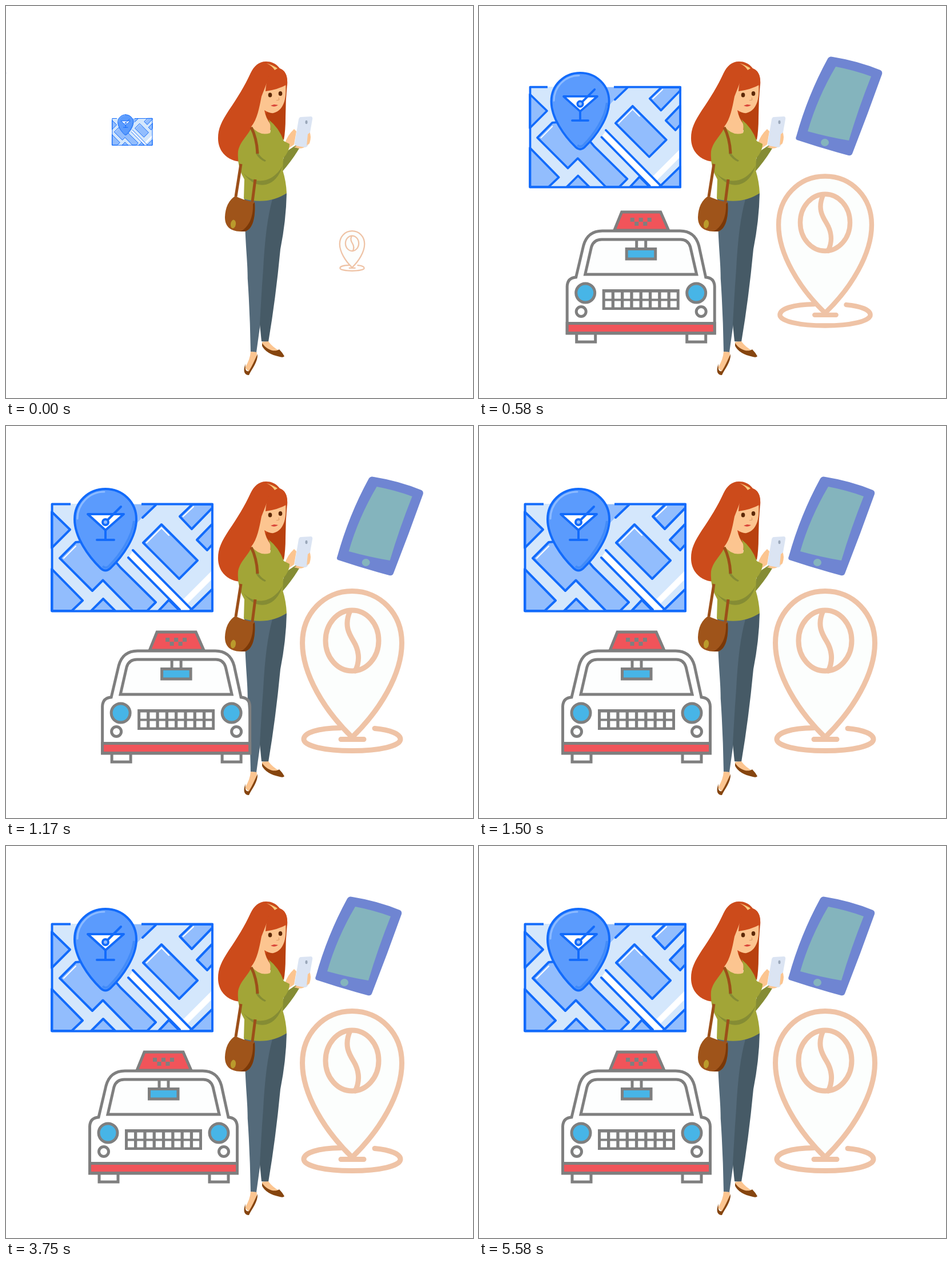
These frames come from a looping animation (817 px wide and 685 px high, 6010 ms). An HTML page:

```html
<!DOCTYPE html>
<html lang="en">
<head>
<meta charset="utf-8">
<title>Out and about</title>
<style>
  html, body { margin: 0; width: 100%; height: 100%; overflow: hidden; background: #fff; }
  svg { display: block; width: 817px; height: 685px; }
  .line { fill: none; stroke: #126bfb; stroke-width: 4; stroke-linecap: round; stroke-linejoin: round; }
  .block { fill: #92bdfd; }
  .shine { fill: none; stroke: #fff; stroke-width: 2; stroke-linecap: round; }
  .car { stroke: #7f7f7f; stroke-width: 5; fill: none; }
  .car .glass { fill: #fdfefe; }
  .car .red { fill: #f1545a; }
  .car .blue { fill: #47b5e7; }
  .car .gray { fill: #7f7f7f; stroke: none; }
  .car .cell { fill: #fdfefe; stroke: none; }
  .coffee { fill: none; stroke: #efc3a6; stroke-width: 9; stroke-linecap: round; stroke-linejoin: round; }
  .skin { fill: #fcc590; }
  .hair { fill: #cc4b1b; }
  .top { fill: #a2a537; }
  .fold { fill: #858c34; }
  .strap { fill: none; stroke: #9c4f19; stroke-width: 5; }
  .shoe { fill: #86450f; }
</style>
</head>
<body>
<svg viewBox="0 0 817 685">
  <g id="tablet">
    <path fill="#6f85d2" d="M597 92Q600 87 606 89Q650 96 689 112Q693 114 692 119Q667 189 640 258Q638 262 633 261Q588 249 543 234Q540 232 542 228Q562 156 597 92Z"/>
    <path fill="#84b4bd" d="M611 106Q643 112 673 123Q651 178 634 235Q598 229 562 219Q579 160 611 106Z"/>
    <ellipse cx="592" cy="238.500" rx="7" ry="6.500" fill="#84b4bd"/>
  </g>

  <g id="woman">
    <path fill="#b9410f" d="M448 178L492 135Q489 165 489 195Q489 218 486 234L456 212Z"/>
    <path class="hair" d="M455 97C442 97 434 105 428 117C417 141 405 160 390 182C377 202 371 214 371 231C371 255 388 270 409 272L432 215L470 170L492 138C493 122 489 113 479 109C472 100 464 97 455 97Z"/>
    <path class="skin" d="M458 130L489 134C491 158 488 182 468 187Q461 188 452 182Q454 195 463 207L462 224Q445 232 429 211C440 197 443 178 447 158Z"/>
    <path class="hair" d="M454 149C455 133 459 114 474 109C488 109 493 122 492 137Q476 146 454 149Z"/>
    <path fill="#f8cb7d" d="M456 100Q468 104 475 109L470 112Q466 105 456 100Z"/>
    <g fill="#5c2908">
      <ellipse cx="462" cy="155.500" rx="3.300" ry="4"/>
      <ellipse cx="480" cy="153" rx="3.300" ry="4"/>
    </g>
    <path d="M473 165L478 164L477 160" fill="none" stroke="#dc9863"/>
    <path fill="#d9453a" d="M463 174L469 172L476 173Q470 178 463 174Z"/>

    <path fill="#546a7a" d="M417 333L468 336L462 410Q455 490 444 562L438 605L428 604Q427 540 423 480C423 440 418 420 417 333Z"/>
    <path fill="#465a66" d="M466 338L491 327Q490 375 480 425Q472 510 459 587L447 586L444 556Q447 500 450 460Q454 380 466 338Z"/>
    <path class="skin" d="M428 604L439 605Q438 622 426 640L418 632Q427 618 428 604ZM448 587L459 586Q466 596 479 603L480 608Q458 604 448 592Z"/>
    <path class="shoe" d="M419 625C414 638 417 645 425 645C430 634 441 622 440 608C435 619 431 628 425 638Q417 640 419 625ZM448 589C455 600 470 606 478 600Q484 606 487 612Q485 615 479 613Q455 608 448 594Z"/>

    <path class="fold" d="M480 291Q484 264 491 254L506 244Q512 243 514 247Q502 268 482 291Z"/>
    <path class="skin" d="M504 247Q512 243 514 235L529 236L531 220Q535 228 531 240Q523 249 513 249ZM487 242Q492 226 504 215L508 219L504 242L494 249Z"/>
    <path class="top" d="M430 211Q444 228 462 222Q465 211 459 198Q478 213 486 236L496 241Q496 254 485 266L484 287Q490 306 491 327Q459 348 416 337L417 303Q404 282 406 254C410 235 422 229 430 211Z"/>
    <path class="fold" d="M413 289C429 311 464 314 484 279Q475 307 455 312C438 316 424 305 413 289ZM437 251Q445 265 455 270L453 272Q444 269 437 258Z"/>

    <path fill="#dbe4f3" d="M516 194L534 193Q537 194 536 198L528 243Q527 247 523 247L507 244Q504 243 505 239L512 198Q513 194 516 194Z"/>
    <ellipse cx="525.500" cy="203" rx="2" ry="3.200" fill="#9aa7b9"/>
    <path class="skin" d="M528 224L532 221L531 238L526 244Z"/>

    <path class="strap" d="M429 212Q439 232 440 258M411 276L402 333M436 303L431 342"/>
    <path fill="#9f541a" d="M401 332Q414 339 435 343C437 370 431 392 417 394C397 395 383 389 383 369Q384 343 401 332Z"/>
    <path fill="#7a3807" d="M435 343C437 370 431 392 417 394L410 394C424 387 433 370 432 346Z"/>
    <ellipse cx="397.500" cy="381" rx="4.500" ry="7.500" fill="#ba9b2c" transform="rotate(8 397 381)"/>
  </g>

  <g id="map">
    <path fill="#d4e7fc" d="M80 136H361V324H80Z"/>
    <path fill="#fff" d="M214 230L222 218L325 322H303ZM308 305L361 252V267L316 312Z"/>
    <g class="line">
      <g class="block">
        <path d="M80 150L112 181L80 213Z"/>
        <path d="M80 250L134 305L115 323H80Z"/>
        <path d="M149 323L170 302L191 323Z"/>
        <path d="M122 203L94 231L151 288L169.500 269.500L222 323H247L262 308L200 247L160 200Z"/>
        <path d="M240 204L272 172L335 235L303 267Z"/>
        <path d="M326 137L304 158L325 180L361 143V137Z"/>
        <path d="M361 171L334 199L352 217L361 207Z"/>
        <path d="M322 323L361 285V323Z"/>
        <path d="M267 323L285 304L304 323Z"/>
        <path d="M200 137H262L238 160L215 185Z" stroke="none"/>
      </g>
      <path d="M262 138L239 160M214 230L304 321M222 217L325 321"/>
      <path stroke-linecap="butt" d="M113 136.500H80.500V323.500H361V136.500H237"/>
    </g>
    <path class="shine" d="M101 231L122 210M246 204L272 178L285 191M310 158L328 141"/>
    <path class="line" style="fill:#5b9bfd" d="M174 110C144 110 120 133 120 163C120 194 144 228 166 249Q174 256 182 249C204 228 228 194 228 163C228 133 204 110 174 110Z"/>
    <path fill="none" stroke="#8dbbff" stroke-width="3" stroke-linecap="round" d="M125 162C125 137 145 115 172 115"/>
    <path fill="none" stroke="#438bf7" stroke-width="4" d="M224 166C221 194 200 225 180 245Q174 250 169 245"/>
    <path class="line" style="fill:#fff" d="M143 154H206L174 182Z"/>
    <path class="line" d="M174 182V199M159 199H189M178 164L201 141"/>
    <circle class="line" style="fill:#8fbcff" cx="174" cy="168" r="5"/>
  </g>

  <g id="pin" class="coffee">
    <path d="M585 527.500C546 528 521 536 521 547.500C521 559 557 567.500 605.500 567.500S690 559 690 547.500C690 538 672 531 645 528.500"/>
    <path fill="#fcfefd" d="M605.500 288.500C556 288.500 518.500 328 518.500 379C518.500 434 557 497 605.500 544C654 497 692.500 434 692.500 379C692.500 328 655 288.500 605.500 288.500Z"/>
    <ellipse cx="605.500" cy="375" rx="46.500" ry="53"/>
    <path d="M602 323C591 348 600 363 608 376S621 408 611 428M586 547.500H626"/>
  </g>

  <g id="taxi" class="car">
    <path d="M163 570V587H196V570M356 570V587H389V570"/>
    <path class="red" d="M242 360H310L324 392H229Z"/>
    <path class="gray" d="M257 370h7v7h-7zM272 370h7v7h-7zM287 370h7v7h-7zM264.500 377h7v7h-7zM279.500 377h7v7h-7z"/>
    <path d="M146.500 572V490Q147 475 162 474L175 419Q182 393 208 393H344Q370 393 377 419L389 474Q404 475 404.500 490V572Z"/>
    <path class="glass" d="M178 469L189 421Q193 408 207 408H345Q358 408 362 421L373 469Z"/>
    <path d="M268 408V424M284 408V424"/>
    <path class="blue" d="M250.500 424.500H301V442H250.500Z"/>
    <g class="blue">
      <circle cx="178.500" cy="501.500" r="16.500"/>
      <circle cx="372.500" cy="501.500" r="16.500"/>
    </g>
    <circle class="glass" cx="171" cy="534" r="8.500"/>
    <circle class="glass" cx="381" cy="534" r="8.500"/>
    <g id="grille"><path class="gray" d="M208 495H343V531H208Z"/></g>
    <path class="red" d="M146.500 554.500H404.500V571.500H146.500Z"/>
  </g>
</svg>
<script>
  const LOOP = 6010, FPS = 12, ENTER = 1500;
  const el = id => document.getElementById(id);
  const svgNS = 'http://www.w3.org/2000/svg';

  for (let i = 0; i < 16; i++) {
    const cell = document.createElementNS(svgNS, 'rect');
    const place = { x: 213 + 16.3 * (i % 8), y: i < 8 ? 500.5 : 515.5, width: 11, height: 11, class: 'cell' };
    for (const key in place) cell.setAttribute(key, place[key]);
    el('grille').append(cell);
  }

  const backOut = p => 1 + 2.70158 * (p - 1) ** 3 + 1.70158 * (p - 1) ** 2;
  const quintOut = p => 1 - (1 - p) ** 5;

  function slide(id, distance, p) {
    el(id).setAttribute('transform', `translate(${distance * (backOut(p) - 1)} 0)`);
  }

  function grow(id, x, y, p) {
    const scale = 0.25 + 0.75 * quintOut(p);
    el(id).setAttribute('transform', `translate(${x} ${y}) scale(${scale}) translate(${-x} ${-y})`);
  }

  function draw() {
    // Hold each pose for one twelfth of a second.
    const time = performance.now() % LOOP;
    const step = Math.floor(time * FPS / 1000 + 0.05);
    const p = Math.min(1, step * 1000 / FPS / ENTER);
    slide('tablet', 692, p);
    slide('taxi', 407, p);
    grow('map', 221, 216.5, p);
    grow('pin', 605.5, 428, p);
    requestAnimationFrame(draw);
  }
  draw();
</script>
</body>
</html>
```
